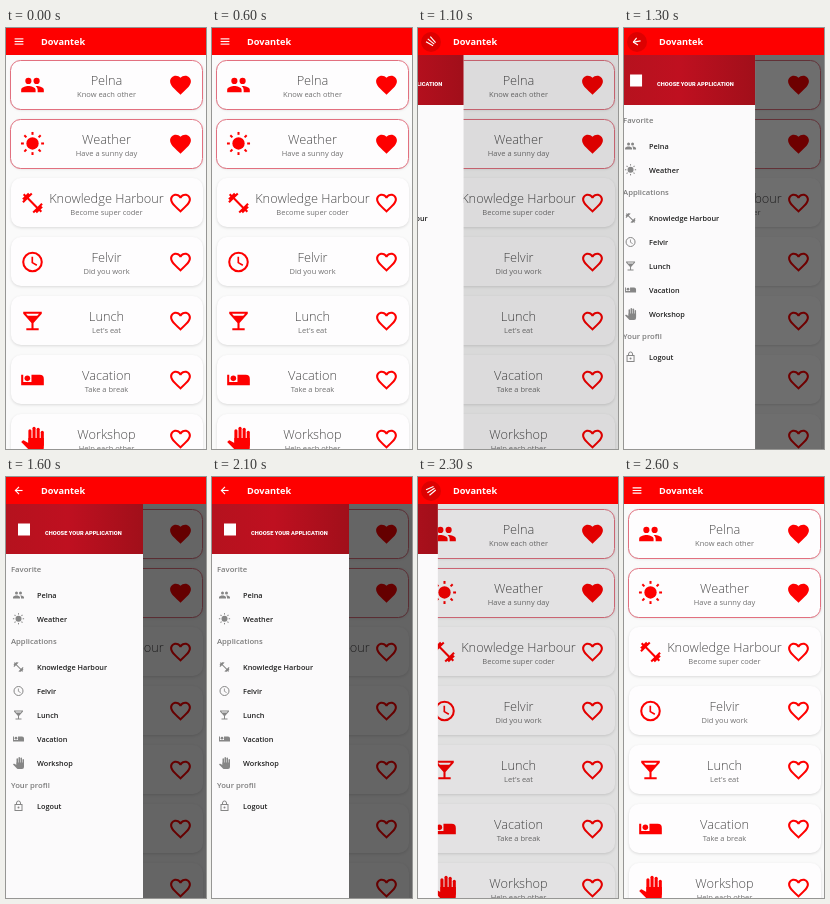
Write an HTML page with a canvas that moves like this. It is 200 px wide and 421 px high and loops after 2700 ms.

```html
<!DOCTYPE html>
<html lang="en">
<head>
<meta charset="utf-8">
<title>App menu</title>
<style>
  html, body { margin: 0; width: 100%; height: 100%; overflow: hidden; background: #fafafa; }
  canvas { display: block; width: 200px; height: 421px; }
</style>
</head>
<body>
<canvas id="stage"></canvas>
<script>
const W = 200, H = 421, LOOP = 2700, STEP = 100;
const BAR = 27, DRAWER = 137, DP = 0.487;
const OPEN_AT = 1060, CLOSE_AT = 2135, SLIDE = 515, LAG = 15;
const RED = '#fe0000';
const FONT = '"Open Sans", "Noto Sans", sans-serif';

const canvas = document.getElementById('stage');
const ctx = canvas.getContext('2d');
const ratio = window.devicePixelRatio || 1;
canvas.width = W * ratio;
canvas.height = H * ratio;

const apps = [
  { name: 'Pelna', note: 'Know each other', icon: 'people', liked: true },
  { name: 'Weather', note: 'Have a sunny day', icon: 'sun', liked: true },
  { name: 'Knowledge Harbour', note: 'Become super coder', icon: 'dumbbell' },
  { name: 'Felvir', note: 'Did you work', icon: 'clock' },
  { name: 'Lunch', note: "Let's eat", icon: 'glass' },
  { name: 'Vacation', note: 'Take a break', icon: 'bed' },
  { name: 'Workshop', note: 'Help each other', icon: 'hand' }
];

const heart = new Path2D('M12 21.35l-1.45-1.32C5.4 15.36 2 12.28 2 8.5 2 5.42 4.42 3 7.5 3c1.74 0 3.41.81 4.5 2.09C13.09 3.81 14.76 3 16.5 3 19.58 3 22 5.42 22 8.5c0 3.78-3.4 6.86-8.55 11.54z');
const heartHole = new Path2D('M12 18.65C7.14 14.24 4 11.39 4 8.5 4 6.5 5.5 5 7.5 5c1.54 0 3.04.99 3.57 2.36h1.87C13.46 5.99 14.96 5 16.5 5c2 0 3.5 1.5 3.5 3.5 0 2.89-3.14 5.74-8 10.15z');
const heartOutline = new Path2D(heart);
heartOutline.addPath(heartHole);

const dumbbell = new Path2D('M20.57 14.86L22 13.43 20.57 12 17 15.57 8.43 7 12 3.43 10.57 2 9.14 3.43 7.71 2 5.57 4.14 4.14 2.71 2.71 4.14l1.43 1.43L2 7.71l1.43 1.43L2 10.57 3.43 12 7 8.43 15.57 17 12 20.57 13.43 22l1.43-1.43L16.29 22l2.14-2.14 1.43 1.43 1.43-1.43-1.43-1.43L22 16.29z');
const glass = new Path2D('M21 5V3H3v2l8 9v5H6v2h12v-2h-5v-5zM7.43 7L5.66 5h12.69l-1.78 2z');
const palm = new Path2D('M8 11H23V20q0 4-4 4h-7.3q-1.7 0-2.85-1.19L1 14.83l1.3-1.25q.7-.5 1.4-.13L8 15.9z');
const shoulders = new Path2D('M8 13c-2.33 0-7 1.17-7 3.5V19h14v-2.5c0-2.33-4.67-3.5-7-3.5zM16 13l-.97.05Q17 14.5 17 16.5V19h6v-2.5c0-2.33-4.67-3.5-7-3.5z');
const bed = new Path2D('M1 7H3V14H11V7H19q4 0 4 4V17H1z');

function disc(x, y, r) {
  ctx.beginPath();
  ctx.arc(x, y, r, 0, Math.PI * 2);
}

function line(...points) {
  ctx.beginPath();
  for (let i = 0; i < points.length; i += 2) ctx.lineTo(points[i], points[i + 1]);
  ctx.stroke();
}

function roundBox(x, y, w, h, r) {
  ctx.beginPath();
  ctx.roundRect(x, y, w, h, r);
}

// Icons are drawn on a 24 unit grid.
const icons = {
  people() {
    for (const x of [8, 16]) { disc(x, 8, 3); ctx.fill(); }
    ctx.fill(shoulders);
  },
  sun() {
    ctx.translate(12, 11.5);
    disc(0, 0, 6);
    ctx.fill();
    for (let i = 0; i < 8; i++) {
      line(0, 8.4, 0, 11.2);
      ctx.rotate(Math.PI / 4);
    }
  },
  dumbbell() { ctx.fill(dumbbell); },
  clock() {
    disc(12, 12, 9);
    ctx.stroke();
    ctx.lineWidth = 1.6;
    line(11.8, 7, 11.8, 12.6, 16.2, 15.2);
  },
  glass() { ctx.fill(glass, 'evenodd'); },
  bed() {
    ctx.fill(bed);
    disc(7, 10.4, 2.7);
    ctx.fill();
  },
  hand() {
    ctx.fill(palm);
    [2.5, 0, 1, 4].forEach((top, i) => {
      roundBox(8 + 4 * i, top, 3, 15, 1.5);
      ctx.fill();
    });
  },
  lock() {
    ctx.strokeRect(5, 9, 14, 12);
    disc(12, 15, 2);
    ctx.fill();
    ctx.beginPath();
    ctx.arc(12, 6, 4, Math.PI, 0);
    ctx.lineTo(16, 9);
    ctx.moveTo(8, 6);
    ctx.lineTo(8, 9);
    ctx.stroke();
  },
  liked() { ctx.fill(heart); },
  unliked() { ctx.fill(heartOutline, 'evenodd'); }
};

function icon(name, x, y, scale, color) {
  ctx.save();
  ctx.translate(x, y);
  ctx.scale(scale, scale);
  ctx.translate(-12, -12);
  ctx.fillStyle = ctx.strokeStyle = color;
  ctx.lineWidth = 2;
  icons[name]();
  ctx.restore();
}

function text(str, x, y, font, color, align = 'left') {
  ctx.font = font;
  ctx.fillStyle = color;
  ctx.textAlign = align;
  ctx.fillText(str, x, y);
}

function drawCard(app, i) {
  const y = 32 + i * 59;
  ctx.save();
  ctx.shadowColor = 'rgba(0,0,0,.13)';
  ctx.shadowBlur = 3 * ratio;
  ctx.shadowOffsetY = ratio;
  ctx.fillStyle = '#fefdfe';
  roundBox(5, y, 192, 49, 10);
  ctx.fill();
  ctx.restore();
  if (app.liked) {
    ctx.strokeStyle = '#e2707f';
    ctx.lineWidth = 1;
    roundBox(4.5, y + 0.5, 192, 49, 10);
    ctx.stroke();
  }
  icon(app.icon, 26.5, y + 25, 1.03, RED);
  icon(app.liked ? 'liked' : 'unliked', 174.5, y + 25, 1.04, RED);
  text(app.name, 100.5, y + 24.5, `350 12.8px ${FONT}`, '#4c4c4c', 'center');
  text(app.note, 100.5, y + 36.5, `400 7.5px ${FONT}`, '#707070', 'center');
}

function drawerRow(label, glyph, y) {
  icon(glyph, 12.5, y, 0.5, '#868686');
  text(label, 31, y + 2.6, `600 7.3px ${FONT}`, '#202020');
}

function drawDrawer(open) {
  ctx.save();
  ctx.translate(DRAWER * (open - 1), 0);
  ctx.fillStyle = '#fbfafb';
  ctx.fillRect(0, BAR, DRAWER, H - BAR);

  const shade = ctx.createLinearGradient(0, 0, DRAWER, 0);
  shade.addColorStop(0, '#b5121e');
  shade.addColorStop(0.45, '#bf1020');
  shade.addColorStop(1, '#a10f1a');
  ctx.fillStyle = shade;
  ctx.fillRect(0, BAR, DRAWER, 50);
  ctx.fillStyle = '#fff';
  ctx.fillRect(12, 46.5, 12, 12);
  text('CHOOSE YOUR APPLICATION', 39, 58.3, '900 5.7px Roboto, sans-serif', '#fff');

  const heading = (str, y) => text(str, 5, y + 2.7, `600 7.7px ${FONT}`, '#7c7c7c');
  heading('Favorite', 92);
  heading('Applications', 164);
  heading('Your profil', 308.5);
  apps.forEach((app, i) => drawerRow(app.name, app.icon, (app.liked ? 118 : 142) + i * 24));
  drawerRow('Logout', 'lock', 329);
  ctx.restore();
}

// Three bars turn into a back arrow; the turn is mirrored on the way back.
function drawMenuIcon(open, closing) {
  const mix = (a, b) => a + (b - a) * open;
  const head = mix(18, 8 * Math.SQRT2);
  const shaft = mix(18, 16);
  const angle = mix(0, Math.PI / 4);
  const cut = mix(0, 0.7);
  const offset = mix(5.4, -0.7);
  const dx = head * Math.cos(angle), dy = head * Math.sin(angle);
  const left = -shaft / 2;
  ctx.save();
  ctx.translate(13, 13.5);
  ctx.scale(DP, DP);
  ctx.rotate((closing ? 1 : -1) * Math.PI * (1 - open));
  ctx.strokeStyle = '#fff';
  ctx.lineWidth = 2.3;
  line(left + cut, 0, -left - cut, 0);
  line(left, offset, left + dx, offset + dy);
  line(left, -offset, left + dx, -offset - dy);
  ctx.restore();
}

// The pressed mark behind the menu icon, shown briefly after each tap.
function drawPress(t) {
  const age = t - (t < CLOSE_AT ? OPEN_AT : CLOSE_AT) + 65;
  if (age < 0 || age > 360) return;
  ctx.fillStyle = 'rgba(0,0,0,.13)';
  disc(13, 14, 10);
  ctx.fill();
}

function easeOut(t, start) {
  const u = Math.min(1, Math.max(0, (t - start) / SLIDE));
  return 1 - Math.pow(1 - u, 5);
}

const openness = t => easeOut(t, OPEN_AT) - easeOut(t, CLOSE_AT);

function draw(t) {
  const open = openness(t);
  const late = openness(t - LAG);
  ctx.setTransform(ratio, 0, 0, ratio, 0, 0);
  ctx.fillStyle = '#fafafa';
  ctx.fillRect(0, 0, W, H);
  apps.forEach(drawCard);
  ctx.fillStyle = `rgba(0,0,0,${(0.6 * late).toFixed(4)})`;
  ctx.fillRect(0, BAR, W, H - BAR);
  if (open > 0) drawDrawer(open);
  ctx.fillStyle = RED;
  ctx.fillRect(0, 0, W, BAR);
  drawPress(t);
  drawMenuIcon(late, t > CLOSE_AT);
  text('Dovantek', 35, 17.4, `700 9.2px ${FONT}`, '#fff');
}

const began = performance.now();
function tick() {
  const t = (performance.now() - began) % LOOP;
  draw(Math.floor(t / STEP) * STEP);
  requestAnimationFrame(tick);
}
tick();
</script>
</body>
</html>
```
